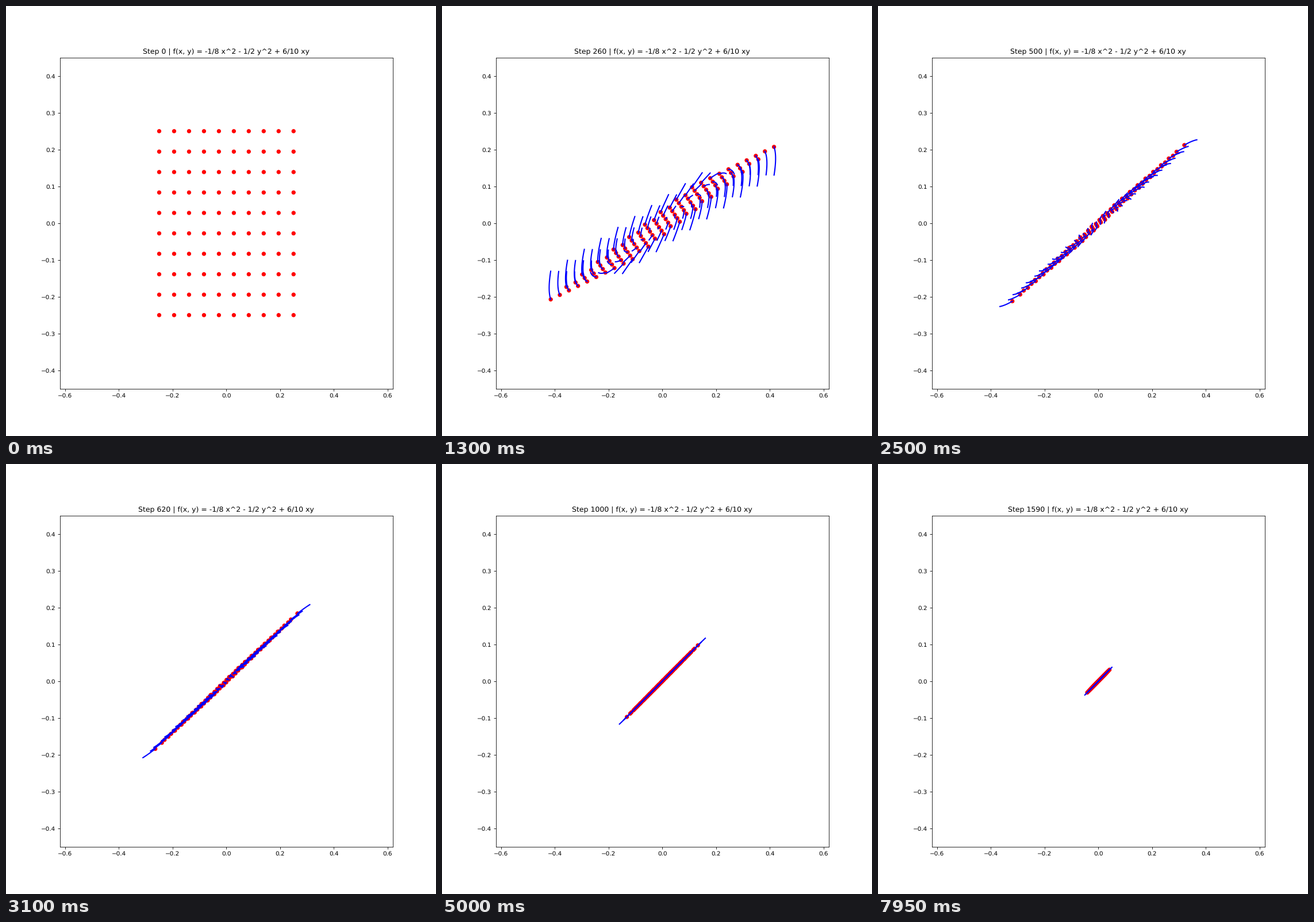
Write a matplotlib script that moves like this. It is 748 by 748 pixels and loops after 8 s.

```python
import numpy as np
import matplotlib.pyplot as plt
from matplotlib.animation import FuncAnimation
from matplotlib.collections import LineCollection

INCHES, DPI = 10, 74.8    # 748 by 748 pixels
FRAMES, INTERVAL = 160, 50
STRIDE = 10      # descent-ascent steps per frame
TRAIL = 100      # steps kept in each trail
RATE = 0.01
FORMULA = "f(x, y) = -1/8 x^2 - 1/2 y^2 + 6/10 xy"

# Simultaneous updates: x descends on f, y ascends on f
update = np.eye(2) + RATE * np.array([[0.25, -0.6], [0.6, -1.0]])

axis = np.linspace(-0.25, 0.25, 10)
points = np.array([(x, y) for x in axis for y in axis])
path = [points]
for _ in range(STRIDE * (FRAMES - 1)):
    path.append(path[-1] @ update.T)
path = np.array(path)    # step, point, coordinate

plt.rcParams["font.family"] = "DejaVu Sans"
plt.rcParams["text.hinting"] = "none"
fig, ax = plt.subplots(figsize=(INCHES, INCHES), dpi=DPI)
title = ax.set_title("")
# One size per dot keeps the dots off the whole-pixel grid, so they glide
dots = ax.scatter(*points.T, s=np.full(len(points), 36), color="red")
trails = LineCollection([], colors="blue", linewidths=2, zorder=2,
                        capstyle="projecting", joinstyle="round")
ax.add_collection(trails, autolim=False)
ax.set_xlim(-0.62, 0.62)
ax.set_ylim(-0.45, 0.45)


def draw(frame):
    step = frame * STRIDE
    title.set_text(f"Step {step} | {FORMULA}")
    dots.set_offsets(path[step])
    recent = path[max(0, step - TRAIL):step + 1]
    trails.set_segments(list(recent.transpose(1, 0, 2)) if step else [])
    return dots, trails, title


anim = FuncAnimation(fig, draw, frames=FRAMES, interval=INTERVAL,
                     repeat=True, repeat_delay=0, blit=False)
plt.show()
```
